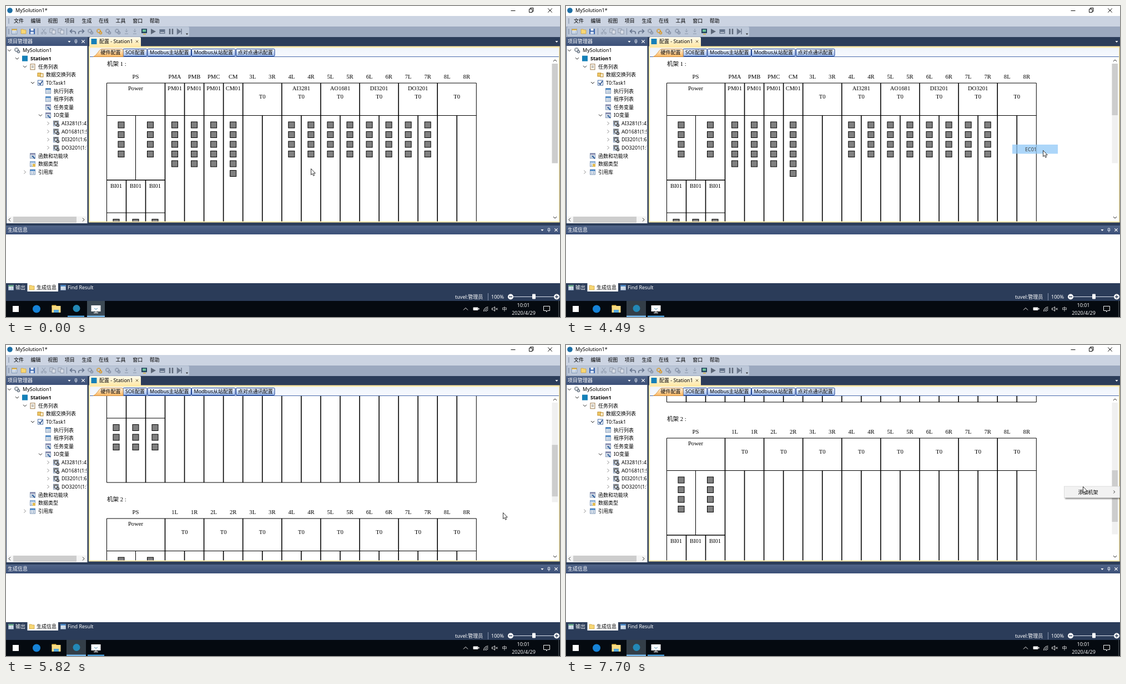
These frames come from a looping animation (998x561 px, 8 s). An HTML page:

```html
<!DOCTYPE html>
<html lang="zh">
<head>
<meta charset="utf-8">
<style>
html, body { margin: 0; width: 100%; height: 100%; overflow: hidden; background: #2b3c59; }
svg { display: block; }
text { font: 9px "Noto Sans", "Noto Sans CJK SC", sans-serif; white-space: pre; }
.rack text { font: 10.6px "Liberation Serif", "Noto Sans CJK SC", serif; }
.menu { filter: drop-shadow(2px 2px 1px rgba(0, 0, 0, .45)); }
</style>
</head>
<body>
<svg id="stage" width="998" height="561" viewBox="0 0 998 561"></svg>
<script>
const rect = (x, y, w, h, fill, more = '') =>
  `<rect x="${x}" y="${y}" width="${w}" height="${h}" fill="${fill}" ${more}/>`;
const path = (d, stroke = '#000', width = 1, fill = 'none') =>
  `<path d="${d}" stroke="${stroke}" stroke-width="${width}" fill="${fill}"/>`;
const dot = (x, y, r, fill, more = '') => `<circle cx="${x}" cy="${y}" r="${r}" fill="${fill}" ${more}/>`;
// y is the vertical middle of the text
const text = (x, y, s, fill = '#000', more = '') =>
  `<text x="${x}" y="${y + 3.3}" fill="${fill}" ${more}>${s}</text>`;
const mid = (x, y, s, fill) => text(x, y, s, fill, 'text-anchor="middle"');
const group = (id, body, more = '') => `<g id="${id}" ${more}>${body}</g>`;
const grad = (id, a, b) => `<linearGradient id="${id}" x2="0" y2="1"><stop stop-color="${a}"/><stop offset="1" stop-color="${b}"/></linearGradient>`;
const clip = (id, x, y, w, h) => `<clipPath id="${id}">${rect(x, y, w, h, '#000')}</clipPath>`;
const chevron = (x, y, dir, color = '#444', s = 2.5) => path({
  down: `M${x - s} ${y - s / 2}l${s} ${s}l${s} ${-s}`,
  up: `M${x - s} ${y + s / 2}l${s} ${-s}l${s} ${s}`,
  right: `M${x - s / 2} ${y - s}l${s} ${s}l${-s} ${s}`,
  left: `M${x + s / 2} ${y - s}l${-s} ${s}l${s} ${s}`
}[dir], color);
const cross = (x, y, s, color, w = 1) => path(`M${x - s} ${y - s}l${2 * s} ${2 * s}m0 ${-2 * s}l${-2 * s} ${2 * s}`, color, w);
const paneTools = (x, y, gap) =>
  path(`M${x - 2.5} ${y - 1}h5l-2.5 3z`, 'none', 0, '#fff') +
  path(`M${x + gap - 1.5} ${y - 3}v4m3 -4v4m-3 -4h3m-4 4h5m-2.5 0v3`, '#dde4f0') +
  cross(x + 2 * gap + 1, y, 2.7, '#fff', 1.2);

function page(x, y, mark = '#3d7fc1') {
  return rect(x - 4.5, y - 4.5, 9, 9, '#f4f8fc', 'stroke="#7b93b5"') +
    rect(x - 4.5, y - 4.5, 9, 2.5, mark) +
    path(`M${x - 3} ${y}h2m1 0h3m-6 2.5h2m1 0h3`, '#6584a8');
}
function gear(x, y, color) {
  return dot(x - 1, y - 1, 3, 'none', `stroke="${color}" stroke-width="2" stroke-dasharray="1.7 .7"`) +
    dot(x + 2.5, y + 2.5, 2, 'none', `stroke="${color}" stroke-width="1.6"`);
}
function folder(x, y, s = 1) {
  return path(`M${x - 5 * s} ${y + 4 * s}v${-8 * s}h${4 * s}l${s} ${s}h${4 * s}v${7 * s}z`, '#c79a34', .7, '#f7d774');
}

function titleAndMenus() {
  const names = ['文件', '编辑', '视图', '项目', '生成', '在线', '工具', '窗口', '帮助'];
  return rect(0, 0, 998, 18, '#fff') + dot(7, 8, 4.8, '#1d6fa5') + text(17, 8, 'MySolution1*') +
    path('M909.5 8.5h8M942.5 5.5h5.5v6h-5.5zM944.5 5v-1.5h5.5v6h-2', '#111') + cross(980, 8, 3.7, '#111') +
    rect(0, 18, 998, 19, '#ccd4e2') + path('M5 22v10', '#8391a8', 1.2) +
    names.map((s, i) => text(14 + 30.6 * i, 27, s)).join('');
}

function toolbar() {
  const y = 46, dim = '#8d99ac';
  let out = rect(0, 37, 998, 19, '#9ca9bf') + rect(2, 37.5, 328, 17.5, '#bcc7d8', 'rx="2"') +
    path('M5 41v10', '#75849d', 1.2) + path('M57.5 40v12M109.5 40v12', '#8593aa') +
    page(15, y, '#e3b447') + folder(32, y) +
    rect(42, 41, 10, 10, '#3865ae', 'rx="1"') + rect(44.5, 41, 5, 3.5, '#fff') + rect(44, 46.5, 6, 4, '#dfe7f5') +
    path('M65 41l5 7m1 -7l-5 7', dim) + dot(65, 49, 1.6, 'none', `stroke="${dim}"`) + dot(71, 49, 1.6, 'none', `stroke="${dim}"`);
  for (const x of [84, 99]) out += rect(x - 5, 41, 6, 7, '#c9d0dc', `stroke="${dim}"`) + rect(x - 1, 43.5, 6, 7, '#d8dde6', `stroke="${dim}"`);
  out += path('M116 45.5h6q4 0 3 5M119 42l-3.5 3.5 3.5 3.5', '#64728a', 1.6) +
    path('M140 45.5h-6q-4 0 -3 5M137 42l3.5 3.5 -3.5 3.5', '#64728a', 1.6);
  for (const x of [152, 168, 184, 201]) out += gear(x, y, x == 168 ? '#d99822' : '#8591a5');
  for (const x of [217, 232]) out += path(`M${x} 41v6m-2.5 -2.5l2.5 2.5 2.5 -2.5M${x - 3} 50h6`, dim);
  return out + rect(244, 41, 10, 8, '#26445f') + rect(246, 42.5, 6, 4, '#6cc49b') + rect(247, 50, 5, 1.5, '#d4b23e') +
    path('M261 41l9 5 -9 5z', 'none', 0, '#5d6879') + rect(276.5, 42, 10, 8, '#66758c') + rect(278, 47, 7, 1.5, '#cbd3df') +
    path('M295 41v10m5 -10v10', '#5d6879', 2.5) + path('M308.5 41.5l6 4.5 -6 4.5zM316 41v10', '#6c788c', 1.5, '#6c788c') +
    path('M324 49.5h4l-2 2.5z', 'none', 0, '#222');
}

function projectTree() {
  // depth, label, icon kind, open state
  const items = [
    [0, 'MySolution1', 'gear', 'down'], [1, 'Station1', 'box', 'down'], [2, '任务列表', 'clip', 'down'],
    [3, '数据交换列表', 'swap'], [3, 'T0:Task1', 'check', 'down'], [4, '执行列表', 'page'], [4, '程序列表', 'page'],
    [4, '任务变量', 'var'], [4, 'IO变量', 'var', 'down'], [5, 'AI3281(1:4)', 'io', 'right'], [5, 'AO1681(1:5)', 'io', 'right'],
    [5, 'DI3201(1:6)', 'io', 'right'], [5, 'DO3201(1:7)', 'io', 'right'], [2, '函数和功能块', 'var'], [2, '数据类型', 'type'],
    [2, '引用库', 'page', 'right']];
  const icons = {
    gear: (x, y) => gear(x, y, '#6b7785'),
    box: (x, y) => rect(x - 5, y - 5, 10, 10, '#1580b8'),
    clip: (x, y) => rect(x - 4, y - 4.5, 8, 10, '#fffaf0', 'stroke="#9b7a50"') + path(`M${x - 2} ${y - 1}h4m-4 2.5h4`, '#777'),
    swap: (x, y) => rect(x - 5, y - 3, 6, 6, '#f2cc6a', 'stroke="#bd8a25"') + rect(x, y - 2, 5, 6, '#f7eed5', 'stroke="#bd8a25"'),
    check: (x, y) => rect(x - 4.5, y - 4.5, 9, 9, '#fff', 'stroke="#4a6fa5"') + path(`M${x - 3} ${y}l2.5 3 4 -6`, '#244d8c', 1.6),
    page,
    var: (x, y) => page(x, y, '#88a') + path(`M${x - 1} ${y}l5 5`, '#305f9c', 2),
    io: (x, y) => page(x, y, '#888') + gear(x + 1, y + 1, '#555'),
    type: (x, y) => page(x, y, '#8fb6de') + rect(x, y, 5, 5, '#e5bd4f')
  };
  const rows = items.map(([depth, label, kind, open], i) => {
    const x = 30 + 14 * depth, y = 80 + 14.64 * i;
    return icons[kind](x - 10, y) + text(x, y, label, '#000', depth == 1 ? 'style="font-weight:bold"' : '') +
      (open ? chevron(x - 24, y, open, open == 'down' ? '#222' : '#888', 3) : '');
  }).join('');
  return rect(0, 56, 147, 16.5, 'url(#head)') + text(3, 64, '项目管理器', '#fff') + paneTools(114, 64, 12) +
    rect(1, 72, 145.5, 320, '#fff') + `<g clip-path="url(#treeClip)">${rows}</g>` +
    rect(1, 379.5, 145, 12, '#f5f5f5') + rect(13, 380, 114, 11, '#cdcdcd') +
    chevron(6.5, 385.5, 'left', '#222', 3) + chevron(139.5, 385.5, 'right', '#222', 3);
}

function rack(n, top, columns, singles) {
  const left = 181.5, ps = 286.5, unit = 35.05, right = ps + 16 * unit, bottom = top + 350, head = top + 58.5;
  const led = (x, y, count) => Array.from({ length: count }, (_, k) =>
    rect(x - 5.5, y + 17.5 * k - 5.5, 11, 11, '#808080', 'stroke="#000"')).join('');
  const thick = d => path(d, '#000', 1.6);
  const serif = (x, y, s) => mid(x, y + .3, s);
  let out = text(182, top - 34, `机架 ${n} :`) + serif(233.5, top - 12, 'PS') + serif(233.5, top + 9, 'Power') +
    path(`M${left} ${top}H${right}V${bottom}H${left}ZM${left} ${head}H${right}M233.5 ${head}V${top + 175}M${left} ${top + 234}H${ps}`) +
    thick(`M${left} ${top + 175}H${ps}M${ps} ${top}V${bottom}M216.5 ${top + 175}V${bottom}M251.5 ${top + 175}V${bottom}`) +
    led(207.5, top + 75.5, 4) + led(260, top + 75.5, 4);
  for (const x of [198.5, 233.5, 268.5]) out += serif(x, top + 185, 'BI01') + led(x, top + 251, 3);
  singles.forEach(([name, module, count], i) => {
    const x = ps + unit * (i + .5);
    out += serif(x, top - 12, name) + serif(x, top + 9, module) + led(x, top + 75.5, count) +
      thick(`M${x + unit / 2} ${top}V${bottom}`);
  });
  columns.forEach((module, i) => {
    const slot = i + 1 + singles.length / 2, x = ps + 2 * unit * (slot - 1);
    out += serif(x + unit / 2, top - 12, slot + 'L') + serif(x + unit * 1.5, top - 12, slot + 'R') +
      serif(x + unit, top + 9, module) + serif(x + unit, top + 24, 'T0') + thick(`M${x + unit} ${head}V${bottom}`);
    if (slot < 8) out += thick(`M${x + 2 * unit} ${top}V${bottom}`);
    if (module) out += led(x + unit / 2, top + 75.5, 4) + led(x + unit * 1.5, top + 75.5, 4);
  });
  return out;
}

function workspace() {
  const tabs = [[211, 43, 'SOE配置'], [255, 78.5, 'Modbus主站配置'], [334.5, 78.5, 'Modbus从站配置'], [414.5, 69.5, '点对点通讯配置']];
  const racks =
    rack(1, 139, ['', 'AI3281', 'AO1681', 'DI3201', 'DO3201', ''],
      [['PMA', 'PM01', 5], ['PMB', 'PM01', 5], ['PMC', 'PM01', 5], ['CM', 'CM01', 6]]) +
    rack(2, 554, Array(8).fill(''), []);
  return path('M150 73V58q0-2 2-2h89q2 0 2 2v15z', 'none', 0, 'url(#gold)') + rect(153.5, 59, 10, 10, '#1580b8') +
    text(168, 64, '配置 - Station1') + cross(236, 64, 2.2, '#75633d') + path('M989.5 63h5l-2.5 3z', 'none', 0, '#fff') +
    rect(149, 72.5, 848.5, 318, '#ffe8a6') + rect(151, 75.5, 845, 313, '#fff') + rect(151, 75.5, 845, 15.5, 'url(#strip)') +
    tabs.map(([x, w, s]) => rect(x, 77.5, w, 13, 'url(#tab)', 'stroke="#1b3f8f" rx="1.5"') + mid(x + w / 2, 84, s)).join('') +
    path('M151 91.5H996', '#4668aa') + path('M157 91.5q4-1 8-7t7-7h36q3 0 3 3v11z', '#d18b35', .8, 'url(#orange)') + text(170.5, 84, '硬件配置') +
    `<g clip-path="url(#docClip)">${group('racks', racks, 'class="rack"')}</g>` +
    rect(983.5, 104, 10.5, 180, '#f0f0f0', 'id="track"') + rect(983.5, 104, 10.5, 180, '#cdcdcd', 'id="thumb"') +
    chevron(989, 98.5, 'up', '#222', 3) + chevron(989, 381.5, 'down', '#222', 3);
}

function bottomPanes() {
  return rect(0, 396, 998, 16, 'url(#head)') + text(3, 404, '生成信息', '#fff') + paneTools(966, 404, 12) +
    rect(0, 412, 998, 88, '#fff') + rect(38.5, 500, 55.5, 15, '#fff') +
    page(9, 508, '#5aa07a') + text(17, 507.5, '输出', '#fff') + folder(47, 508) + text(55, 507.5, '生成信息') +
    page(103, 508) + text(111, 507.5, 'Find Result', '#fff') +
    text(809, 524.5, 'tuvel:管理员', '#fff') + path('M868.5 518v13', '#8795b0') + text(874, 524.5, '100%', '#fff') +
    path('M914 524.5h73', '#dbe1ec') + rect(948, 519.5, 6, 9, '#fff', 'rx="1"') +
    dot(909, 524.5, 5, '#fff') + dot(992, 524.5, 5, '#fff') + path('M906 524.5h6M989 524.5h6m-3 -3v6', '#2b3c59', 1.3);
}

function taskbar() {
  const w = '#f2f2f2';
  return rect(0, 532, 998, 29, '#050a10') +
    group('before', rect(146, 532, 32, 29, '#3c4a55') + rect(111, 558.5, 30, 2.5, '#4a9bd6') + rect(146, 558.5, 32, 2.5, '#76b9ed')) +
    group('after', rect(109, 532, 35, 29, '#333e48') + rect(109, 558.5, 35, 2.5, '#76b9ed') + rect(147, 558.5, 30, 2.5, '#4a9bd6')) +
    rect(12, 541, 11, 11, '#fff') + dot(55, 546.5, 7, '#1683d8') +
    rect(82.5, 539.5, 8, 4, '#e5b93e') + rect(82.5, 541, 16, 12, '#fbdc82') + rect(86, 548, 9, 5, '#55a8dc') +
    dot(127, 545.5, 6.5, '#2388b6') +
    rect(153.5, 540, 17, 11, '#fff') + path('M158 553.5h8M162 551v2', '#ddd', 1.4) + path('M159 545q3 4 6 0', '#337fa5') +
    chevron(828, 546.5, 'up', w, 4) + rect(841.5, 543.5, 9, 5.5, w, 'rx="1"') + rect(851, 545, 1.5, 2.5, w) +
    path('M860.5 551a8 8 0 0 1 8 -8M863 551a5.5 5.5 0 0 1 5.5 -5.5M865.5 551a3 3 0 0 1 3 -3', w) +
    path('M875.5 545h2l3 -2.5v8l-3 -2.5h-2z', w, .9) + cross(884, 546.5, 1.7, w) + mid(898, 546.5, '中', w) +
    mid(932, 539.5, '10:01', w) + mid(932.5, 553.5, '2020/4/29', w) +
    path('M968.5 541.5h11v8h-4l-2 2.5v-2.5h-5z', w) + path('M995.5 532v29', '#4a5157');
}

const menuBox = (id, w, body) => group(id,
  rect(0, 0, w, 20.5, '#f2f2f2', 'stroke="#ccc" stroke-width=".6"') +
  rect(2, 2, w - 4, 16.5, '#91c9f7', 'class="hot"') + body, 'class="menu"');

const stage = document.getElementById('stage');
stage.innerHTML = '<defs>' + grad('head', '#506488', '#3c5078') + grad('gold', '#fffbee', '#ffe8a6') +
  grad('strip', '#eef3fb', '#f8faff') + grad('tab', '#f4f8ff', '#9fbdf0') + grad('orange', '#fff2df', '#ffb65c') +
  clip('treeClip', 0, 72, 145.5, 307) + clip('docClip', 151, 92, 832, 296.5) + '</defs>' +
  rect(0, 0, 998, 561, '#2b3c59') + titleAndMenus() + toolbar() + projectTree() + workspace() + bottomPanes() + taskbar() +
  menuBox('main', 100, text(25, 10.3, '添加机架') + chevron(90, 10, 'right', '#333', 2.5)) +
  menuBox('sub', 86, text(25, 10.3, 'EC01')) +
  group('cursor', path('M.5 .5v11.2l2.5-2.3 1.7 3.9 1.9-.8-1.7-3.8h3.4z', '#000', .8, '#fff'));

// start, end, number of steps, destination
const moves = [[370, 850, 7, 925, 239], [930, 1010, 2, 936, 243], [1150, 1310, 3, 886, 248], [2100, 2490, 6, 902, 256],
  [3100, 3250, 3, 860, 260], [3400, 3400, 1, 859, 260], [4950, 5270, 5, 895, 302], [7310, 7380, 2, 931, 255]];
const scrolls = [[0, 0], [5350, 48], [5430, 121], [5500, 169], [5740, 217], [5820, 241], [5990, 289], [6060, 313],
  [6130, 361], [6200, 386], [6370, 434], [6460, 458], [6990, 410], [7070, 386]];
const mainFade = [[0, 0], [1570, .35], [1640, .7], [1700, 1], [4490, 0], [7620, .5], [7700, 1]];
const subFade = [[0, 0], [2660, .5], [2710, 1], [4490, .75], [4560, .5], [4640, .25], [4720, 0]];
const held = (keys, t) => keys.findLast(k => k[0] <= t)[1];

function cursorAt(t) {
  let x = 549, y = 293;
  for (const [start, end, n, toX, toY] of moves) {
    if (t < start) break;
    const done = t >= end ? n : 1 + Math.floor((t - start) / (end - start) * (n - 1));
    const p = done / n, ease = p * p * (3 - 2 * p);
    x += (toX - x) * ease;
    y += (toY - y) * ease;
  }
  return [x, y];
}

const el = id => document.getElementById(id);
const set = (id, attrs) => { for (const k in attrs) el(id).setAttribute(k, attrs[k]); };
const hot = (id, on) => el(id).querySelector('.hot').setAttribute('opacity', on ? 1 : 0);
const at = (x, y) => `translate(${x} ${y})`;

function draw(t) {
  const scroll = held(scrolls, t), late = t > 5000;
  set('before', { opacity: t < 70 ? 1 : 0 });
  set('after', { opacity: t < 70 ? 0 : 1 });
  set('racks', { transform: at(0, -scroll) });
  set('thumb', { y: 104 + scroll * .316, height: t < 4490 ? 179.5 : 93 });
  set('track', { height: t < 6200 ? 179.5 : 237.5 });
  set('main', { transform: late ? at(897.5, 255) : at(886.5, 248), opacity: held(mainFade, t) });
  set('sub', { transform: at(802, 248), opacity: held(subFade, t) });
  hot('main', t >= 2100 && !late);
  hot('sub', t >= 3100);
  el('sub').querySelector('rect').setAttribute('opacity', t < 4490 ? 1 : 0);
  el('sub').style.filter = t < 4490 ? '' : 'none';
  set('cursor', { transform: at(...cursorAt(t)) });
}

const began = performance.now();
function tick() {
  draw((performance.now() - began) % 8000);
  requestAnimationFrame(tick);
}
tick();
</script>
</body>
</html>
```
